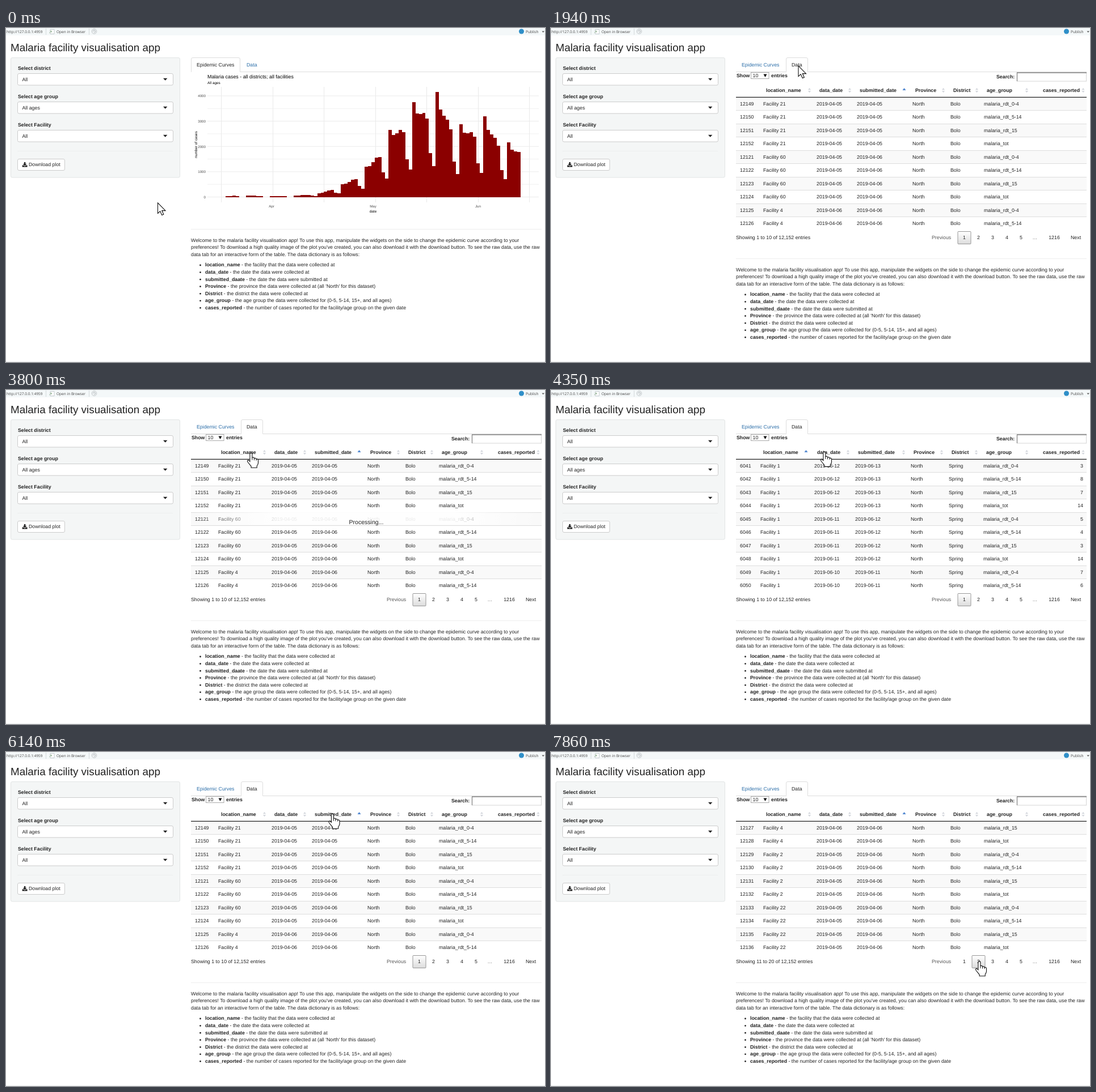
An HTML page for the animation above (8000 ms loop, 950x590 px).

```html
<!DOCTYPE html>
<html lang="en">
<head>
<meta charset="utf-8">
<title>Malaria facility visualisation app</title>
<style>
  html, body { margin: 0; width: 100%; height: 100%; overflow: hidden; background: #fff; }
  svg { display: block; width: 950px; height: 590px; }
  text { font: 8.8px "Liberation Sans", Arial, sans-serif; fill: #222; text-rendering: geometricPrecision; white-space: pre; }
  .b { font-weight: bold; }
  .mid { text-anchor: middle; }
  .end { text-anchor: end; }
  .h2 { font-size: 18.85px; }
  .bar { font: 6.55px "Open Sans", sans-serif; fill: #444; }
  .axis { font-size: 6.2px; fill: #4d4d4d; }
  .label { font-size: 6.4px; fill: #000; }
  .title { font-size: 8.9px; fill: #000; }
  .link { fill: #2a6da8; }
  .hover { fill: #23527c; }
  .dim { fill: #555; }
  .white { fill: #fff; }
  .big { font-size: 10.55px; }
</style>
</head>
<body>
<svg id="stage" viewBox="0 0 950 590"></svg>
<script>
const text = (x, y, s, cls = '', extra = '') => `<text x="${x}" y="${y}" class="${cls}" ${extra}>${s}</text>`;
const rect = (x, y, w, h, fill, stroke = 'none', r = 0, extra = '') =>
  `<rect x="${x}" y="${y}" width="${w}" height="${h}" rx="${r}" fill="${fill}" stroke="${stroke}" ${extra}/>`;
const path = (d, fill, stroke = 'none', w = 1) => `<path d="${d}" fill="${fill}" stroke="${stroke}" stroke-width="${w}"/>`;
const group = (id, body) => `<g id="${id}">${body}</g>`;
const repeat = (n, fn) => Array.from({ length: n }, (_, i) => fn(i)).join('');

const defs = `<defs>
  <linearGradient id="button" x2="0" y2="1"><stop stop-color="#fff"/><stop offset="1" stop-color="#dcdcdc"/></linearGradient>
  <linearGradient id="dark" x2="0" y2="1"><stop stop-color="#585858"/><stop offset="1" stop-color="#111"/></linearGradient>
  <linearGradient id="veil"><stop stop-color="#fff" stop-opacity="0"/><stop offset=".25" stop-color="#fff" stop-opacity=".9"/>
  <stop offset=".75" stop-color="#fff" stop-opacity=".9"/><stop offset="1" stop-color="#fff" stop-opacity="0"/></linearGradient></defs>`;

function toolbar() {
  return rect(0, 0, 950, 13, '#f4f8f9') +
    text(1, 9.2, 'http://127.0.0.1:4959', 'bar') + text(89, 9.2, 'Open in Browser', 'bar') + text(916, 9.2, 'Publish', 'bar') +
    path('M70.5 1V12M146.5 1V12', 'none', '#d5dadc') +
    path('M78 2.5H85V10.5H78Z', '#fff', '#b8c0c4', .8) + path('M76.5 9L80 5.5M77.8 5.3H80.3V7.8', 'none', '#8fb08f') +
    '<circle cx="155.5" cy="6" r="4.3" fill="#eef1f2" stroke="#c3c9cc"/>' + path('M153.5 6A2 2 0 1 1 155.5 8', 'none', '#b5bcc0') +
    '<circle cx="908.5" cy="6" r="4.5" fill="#2f8fc8"/>' + path('M944.5 5.5H949L946.7 8Z', '#555');
}

function sidebar() {
  const fields = [['district', 'All'], ['age group', 'All ages'], ['Facility', 'All']].map(([name, value], i) => {
    const y = 80 + i * 50;
    return text(21, y - 6.2, 'Select ' + name, 'b') + rect(20.5, y + .5, 274, 20.5, '#fff', '#ccc', 2.5) +
      text(28.5, y + 13.8, value) + path(`M277 ${y + 8.8}h7.4l-3.7 4z`, '#222');
  }).join('');
  return rect(8.5, 52.5, 298, 211.5, '#f4f6f6', '#e1e4e4', 2.5) + fields + path('M20 217.5H294', 'none', '#eceeee') +
    rect(20.5, 231.5, 83, 20, '#fff', '#ccc', 2.5) +
    path('M31.8 237H34.4V240.2H36.6L33.1 243.6L29.6 240.2H31.8ZM28.6 242.6H31L33.1 244.6L35.2 242.6H37.6V245.4H28.6Z', '#222') +
    text(40, 244.2, 'Download plot');
}

const tab = (left, right) => path(`M326 77.5H${left}V55Q${left} 52.5 ${left + 2.5} 52.5H${right - 2.5}Q${right} 52.5 ${right} 55V77.5H944`, 'none', '#ddd');

// Daily cases: a level for each Monday, scaled by how busy each weekday is
const mondays = [45, 65, 25, 60, 150, 500, 1200, 2660, 3750, 4160, 2870, 3190, 2170, 2000];
const weekdays = [1, .87, .85, .85, .78, .43, .3];
function casesOn(day) {
  const week = Math.floor(day / 7), d = day % 7;
  const level = mondays[week] + (mondays[week + 1] - mondays[week]) * d / 7;
  return level < 100 && d > 4 ? 0 : level * weekdays[d];
}

function plot() {
  const zero = 298.5, perCase = .04465, dayWidth = 5.967, dayX = day => 468 + (day - 14.5) * dayWidth;
  let out = tab(326.5, 412.5) + text(336, 68, 'Epidemic Curves') +
    group('tabHover', rect(414.5, 53, 38.5, 24, '#eee', 'none', 2.5)) + text(424, 68, 'Data', 'link', 'id="dataLink"');
  out += repeat(7, i => path(`M${Math.round(379 + i * 90.5)}.5 104V308`, 'none', '#e9e9e9')) +
    repeat(9, i => path(`M355 ${zero - i * 500 * perCase}H939`, 'none', '#ebebeb', i % 2 ? .7 : 1)) +
    repeat(5, i => text(352, zero - i * 1000 * perCase + 2.4, i * 1000, 'axis end'));
  const bars = repeat(87, i => `V${zero - casesOn(i + 1) * perCase}H${dayX(i + 2)}`);
  out += `<path d="M${dayX(1)} ${zero}${bars}V${zero}Z" fill="#8b0000" shape-rendering="crispEdges"/>`;
  [['Apr', 468], ['May', 647], ['Jun', 832]].forEach(([s, x]) => out += text(x, 316.5, s, 'axis mid'));
  return out + text(355, 89, 'Malaria cases - all districts; all facilities', 'title') + text(355, 99, 'All ages', 'label') +
    text(647, 326, 'date', 'label mid') + text(0, 0, 'number of cases', 'label mid', 'transform="translate(337 206) rotate(-90)"');
}

const rowTop = 122, rowHeight = 23.5;
const pageX = i => 703.5 + i * 25;

function tableFrame() {
  return tab(414.5, 452.5) + text(336, 68, 'Epidemic Curves', 'link') + text(424, 68, 'Data') +
    text(327, 87.3, 'Show', 'b') + rect(352.5, 78.5, 31.5, 11, '#fff', '#a9a9a9') + text(355.5, 87.3, '10') +
    path('M374.5 81.5H380.5L377.5 87Z', '#111') + text(388, 87.3, 'entries', 'b') + text(785, 88.8, 'Search:', 'b') +
    rect(821.5, 78.5, 122, 15.5, '#fff', '#d5d5d5') + path('M821.5 94V79H944', 'none', '#858585', 1.3) +
    repeat(5, i => rect(326, rowTop + i * 2 * rowHeight, 618, rowHeight, '#f9f9f9')) +
    repeat(9, i => path(`M326 ${Math.floor(rowTop + (i + 1) * rowHeight) + .5}H944`, 'none', '#ddd')) +
    rect(326, 0, 618, rowHeight - 1, '#f6f6f6', 'none', 0, 'id="rowHover"') + path('M326 122.3H944', 'none', '#222', 1.3) +
    text(671, 373.3, 'Previous', 'dim') + text(853, 373.3, '…', 'mid dim') + text(887, 373.3, 1216, 'mid') + text(916, 373.3, 'Next');
}

const names = ['location_name', 'data_date', 'submitted_date', 'Province', 'District', 'age_group', 'cases_reported'];
const ages = ['0-4', '5-14', '15', 'tot'];
const wide = [374, 468, 539, 637, 704, 763], narrow = [369, 464, 536, 634, 701, 762];

// Each facility report gives four rows, one per age group
const report = (first, facility, date, submitted, district) => ages.map((age, i) =>
  [first + i, 'Facility ' + facility, '2019-' + date, '2019-' + submitted, 'North', district, 'malaria_rdt_'.slice(0, age == 'tot' ? 8 : 12) + age]);

function table(id, cols, sorted, rows, counts, page = 1) {
  const header = names.map((name, i) => {
    const x = i < 6 ? cols[i] + 5 : 867, icon = i < 5 ? cols[i + 1] - 12.5 : i < 6 ? 838.5 : 938;
    return text(x, 112.6, name, 'b') + (i == sorted
      ? path(`M${icon - 5} 110h6l-3 -4z`, '#4f86d0')
      : path(`M${icon - 2.6} 109.3h5.2l-2.6 -3.3zM${icon - 2.6} 111h5.2l-2.6 3.3z`, '#d3d6dc'));
  }).join('');
  const body = rows.map((row, r) => {
    const y = 136.8 + r * rowHeight;
    return row.map((s, c) => text(c ? cols[c - 1] : 333, y, s)).join('') + (counts ? text(938, y, counts[r], 'end') : '');
  }).join('');
  return group(id, header + body + text(326, 372.8, `Showing ${page * 10 - 9} to ${page * 10} of 12,152 entries`) +
    rect(pageX(page) - 11.5, 359.5, 23, 22, 'url(#button)', '#979797', 1) + repeat(5, i => text(pageX(i + 1), 373.3, i + 1, 'mid')));
}

function tables() {
  const submit = [21, 60, 4, 2, 22].flatMap((facility, i) => report(i ? 12117 + i * 4 : 12149, facility,
    facility == 4 ? '04-06' : '04-05', i ? '04-06' : '04-05', 'Bolo'));
  const place = [0, 1, 2].flatMap(i => report(6041 + i * 4, 1, `06-${12 - i}`, `06-${13 - i}`, 'Spring'));
  const date = [0, 1, 2].flatMap(i => report(5641 - i * 4, 28, `03-${18 + i}`, '05-27', 'Spring'));
  return table('submit', wide, 2, submit.slice(0, 10)) + table('second', wide, 2, submit.slice(10), null, 2) +
    table('place', narrow, 0, place.slice(0, 10), place.map((_, i) => i % 4 == 3 ? 14 : 3 + i * 5 % 6)) +
    table('date', narrow, 1, date.slice(0, 10), [5, 2, 5, 12, 5, 1, 8, 14, 9, 7]);
}

function notes() {
  const intro = ['Welcome to the malaria facility visualisation app! To use this app, manipulate the widgets on the side to change the epidemic curve according to your',
    "preferences! To download a high quality image of the plot you've created, you can also download it with the download button. To see the raw data, use the raw",
    'data tab for an interactive form of the table. The data dictionary is as follows:'];
  const items = [['location_name', 'the facility that the data were collected at'], ['data_date', 'the date the data were collected at'],
    ['submitted_daate', 'the date the data were submitted at'], ['Province', "the province the data were collected at (all 'North' for this dataset)"],
    ['District', 'the district the data were collected at'], ['age_group', 'the age group the data were collected for (0-5, 5-14, 15+, and all ages)'],
    ['cases_reported', 'the number of cases reported for the facility/age group on the given date']];
  return path('M326 355.5H944', 'none', '#eee') + intro.map((s, i) => text(326, 377.8 + i * 12.6, s)).join('') +
    items.map(([name, s], i) => `<circle cx="342.5" cy="${419 + i * 12.57}" r="1.4" fill="#222"/>` +
      text(351, 421.4 + i * 12.57, `<tspan class="b">${name}</tspan> - ${s}`)).join('');
}

const pointer = '<circle id="click" r="15" fill="#ff0" fill-opacity=".47"/>' +
  group('arrow', path('M.5 .8V19.5L4.7 15.7L7.8 22.5L10.8 21.2L7.8 14.6H14Z', '#fff', '#111', 1.1)) +
  group('hand', path('M-1.6 2.8Q-1.6 .6 .4 .6T2.4 2.8V8.7Q5.6 7.8 6 10.2Q9 9.2 9.6 11.5Q13 10.9 13 13.7V18.7Q12.5 21.7 10.7 23.7V26.7H.6V24.3L-5.4 16.8Q-7 13.8 -4.2 13.4L-1.6 15.8Z', '#fff', '#111', 1.1) +
    path('M2.4 8.7V13.2M6 10.2V13.7M9.6 11.5V14.2', 'none', '#111'));

document.getElementById('stage').innerHTML = defs + rect(0, 0, 950, 590, '#fff') + toolbar() +
  text(8, 40.8, 'Malaria facility visualisation app', 'h2') + sidebar() + path('M0 589.5H950', 'none', '#eef0f0') +
  group('plot', plot()) + group('frame', tableFrame()) + tables() +
  group('pageHover', rect(pageX(2) - 11.5, 359.5, 23, 22, 'url(#dark)', '#111', 1) + text(pageX(2), 373.3, 2, 'mid white')) +
  group('processing', rect(326, 213, 618, 25, 'url(#veil)') + text(635, 236.6, 'Processing...', 'mid big')) +
  group('notes', notes()) + group('pointer', pointer);

const el = {};
document.querySelectorAll('[id]').forEach(node => el[node.id] = node);
const show = (id, on) => el[id].style.display = on ? '' : 'none';

// Pointer moves: start, end, target x and y
const moves = [[690, 1160, 439, 79], [1260, 1480, 435.5, 66], [2570, 2790, 440, 90], [2790, 3040, 431.5, 110.5],
  [3970, 4350, 481.5, 108.7], [5450, 5680, 575, 108.5], [6540, 7320, 754.5, 369]];
// Click, wait and the view that then appears
const clicks = [[1790, 1940, 1940, 'submit'], [3670, 3800, 3970, 'place'], [4820, 4900, 4980, 'date'],
  [5920, 6080, 6140, 'submit'], [7710, 7790, 7860, 'second']];

function pointerAt(t) {
  let x = 267, y = 308;
  for (const [start, end, toX, toY] of moves) {
    const u = Math.min(1, Math.max(0, (t - start) / (end - start))), e = u * u * (3 - 2 * u);
    x += (toX - x) * e;
    y += (toY - y) * e;
  }
  return [x, y];
}

function draw(t) {
  let view = 'plot', clicking = false, waiting = false;
  for (const [down, wait, done, next] of clicks) {
    if (t >= done) view = next;
    clicking ||= t >= down && t < wait;
    waiting ||= t >= wait && t < done;
  }
  const inTable = view != 'plot';
  for (const id of ['plot', 'submit', 'place', 'date', 'second']) show(id, id == view);
  show('frame', inTable);
  show('processing', waiting);
  show('click', clicking);
  el.notes.setAttribute('transform', `translate(0 ${inTable ? 52 : 0})`);

  const [x, y] = pointerAt(t);
  el.pointer.setAttribute('transform', `translate(${x.toFixed(2)} ${y.toFixed(2)})`);
  const overTab = !inTable && y < 77, overPage = inTable && y > 359;
  const hand = overTab || overPage || inTable && y > 98 && y < rowTop;
  show('hand', hand);
  show('arrow', !hand);
  show('tabHover', overTab);
  el.dataLink.setAttribute('class', overTab ? 'hover' : 'link');
  show('pageHover', overPage && view != 'second');
  const row = Math.floor((y - rowTop) / rowHeight);
  show('rowHover', row >= 0 && row < 10);
  el.rowHover.setAttribute('y', rowTop + row * rowHeight + .5);
}

function tick() {
  draw(performance.now() % 8000);
  requestAnimationFrame(tick);
}
tick();
</script>
</body>
</html>
```
